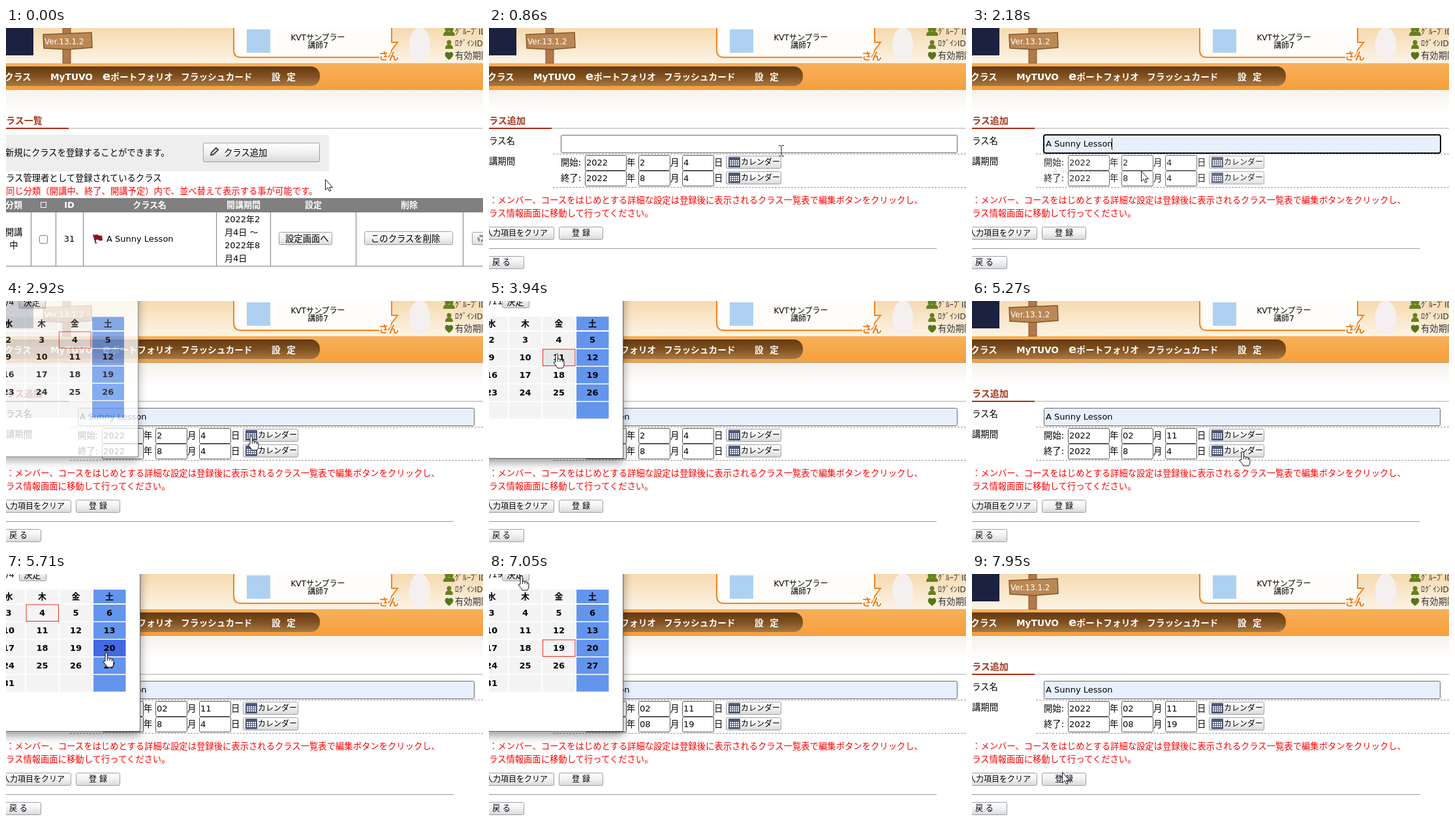
Write an HTML page that moves like this. It is 731x376 px and loops after 8 s.

```html
<!DOCTYPE html>
<html lang="ja">
<head>
<meta charset="utf-8">
<style>
  html, body { margin: 0; width: 100%; height: 100%; overflow: hidden; background: #fff; }
  svg { display: block; }
  text { font: 13.33px 'DejaVu Sans', 'Noto Sans CJK JP', sans-serif; white-space: pre; }
  .input { font-size: 13px; }
  .small { font-size: 12px; }
  .tiny { font-size: 11px; }
  .bold { font-weight: bold; }
  .mid { text-anchor: middle; }
  .nav { font-size: 13.7px; font-weight: bold; fill: #fff; }
  .title { font-size: 14px; font-weight: bold; fill: #a5371c; }
  .suffix { font-size: 15.5px; font-weight: 900; fill: #f47b14; stroke: #fff; stroke-width: 3px; paint-order: stroke; }
  .red { fill: #f00; }
  .window { filter: drop-shadow(0 6px 7px #0006); }
</style>
</head>
<body>
<svg width="731" height="376" viewBox="0 0 731 376">
  <defs>
    <linearGradient id="sky" x2="0" y2="1"><stop stop-color="#f6dab0"/><stop offset="1" stop-color="#fcf3e5"/></linearGradient>
    <linearGradient id="band" x2="0" y2="1"><stop stop-color="#f8b05a"/><stop offset="1" stop-color="#f69f3c"/></linearGradient>
    <linearGradient id="glow" x2="0" y2="1"><stop stop-color="#f6f1ea"/><stop offset="1" stop-color="#fff"/></linearGradient>
    <linearGradient id="bar" x2="0" y2="1"><stop stop-color="#643a12"/><stop offset=".5" stop-color="#80501f"/><stop offset="1" stop-color="#a87845"/></linearGradient>
    <linearGradient id="face" x2="0" y2="1"><stop stop-color="#fff"/><stop offset=".5" stop-color="#f1f1f1"/><stop offset="1" stop-color="#d6d9dc"/></linearGradient>
  </defs>
  <g id="header"></g>
  <g id="page"></g>
  <g id="overlay"></g>
</svg>
<script>
const CLASS_NAME = 'A Sunny Lesson';
const LOOP = 8000, PAGE_TIME = 860, STEP = 146.6;
const byId = id => document.getElementById(id);

const text = (x, y, str, cls = '', extra = '') =>
  `<text x="${x}" y="${y}" class="${cls}" ${extra}>${str}</text>`;
const rect = (x, y, w, h, fill, extra = '') =>
  `<rect x="${x}" y="${y}" width="${w}" height="${h}" fill="${fill}" ${extra}/>`;
const path = (d, stroke, extra = '') => `<path d="${d}" fill="none" stroke="${stroke}" ${extra}/>`;
const button = (x, y, w, h) => rect(x + .5, y + .5, w - 1, h - 1, 'url(#face)', 'stroke="#9a9fa5" rx="2"');
const inputBox = (x, y, value) =>
  rect(x + .5, y + .5, value.length > 3 ? 63 : 48, 23, '#fff', 'stroke="#555" rx="2"') +
  text(x + 2, y + 16, value, 'input');

function header() {
  const person = (x, y) => `<path d="M${x - 6} ${y + 7}q0-7 6-7t6 7z" fill="#66801f"/><circle cx="${x}" cy="${y - 3}" r="3.5" fill="#66801f"/>`;
  return rect(0, 0, 731, 54, 'url(#sky)') + rect(0, 54, 731, 40, 'url(#band)') +
    rect(0, 94, 731, 1, '#b5a48e') + rect(0, 95, 731, 35, 'url(#glow)') +
    rect(0, 0, 42, 42, '#1d2140') +
    rect(87, 0, 12, 54, '#b0794a', 'stroke="#84552c"') +
    '<path d="M57 10L131 7L132 30L95 33L58 31Z" fill="#bb8854" stroke="#84552c" stroke-width="1.5"/>' +
    text(59, 25, 'Ver.13.1.2', 'small', 'fill="#fff"') +
    '<path d="M349 -5V34q0 11 11 11H580q11 0 11-11l9-12h-9V-5Z" fill="#fffdfa" stroke="#f58220" stroke-width="2"/>' +
    rect(369, 2, 36, 36, '#aed1f1') +
    text(478, 19, 'KVTサンプラー', 'small mid') + text(478, 31, '講師7', 'small mid') +
    text(571, 49, 'さん', 'suffix') +
    '<ellipse cx="634" cy="26" rx="16" ry="27" fill="#f5f0f0"/>' +
    person(676, 5) + person(682, 5) + person(679, 25) +
    '<path d="M679 49q-8-6-6-10t6-1q4-3 6 1t-6 10" fill="#55751c"/>' +
    text(688, 10, 'ｸﾞﾙｰﾌﾟID', 'small', 'fill="#333"') +
    text(688, 28, 'ﾛｸﾞｲﾝID', 'small', 'fill="#333"') +
    text(688, 47, '有効期限', '', 'fill="#333"') +
    rect(-20, 59, 501, 30, 'url(#bar)', 'rx="14"') +
    text(-2, 80, 'クラス', 'nav') + text(68, 80, 'MyTUVO', 'nav') +
    text(148, 80, '<tspan font-size="18">e</tspan>ポートフォリオ', 'nav') +
    text(268, 80, 'フラッシュカード', 'nav') + text(407, 80, '設  定', 'nav');
}

const heading = str => text(0, 147, str, 'title') +
  rect(96, 153, 635, 2, '#d3d3d3') + rect(0, 153, 96, 2, '#b02a12');

function listPage() {
  const columns = [[12, '分類'], [97, 'ID'], [220, 'クラス名'], [364, '開講期間'], [471, '設定'], [618, '削除']];
  const dates = ['2022年2', '月4日 ～', '2022年8', '月4日'];
  return heading('ラス一覧') +
    rect(0, 164, 495, 56, '#eee') + text(-1, 196, '新規にクラスを登録することができます。') +
    button(302, 176, 179, 30) + path('M314 195l1-4 7-7 3 3-7 7z', '#444', 'stroke-width="2"') +
    text(334, 196, 'クラス追加') +
    text(0, 235, 'ラス管理者として登録されているクラス') +
    text(0, 255, '同じ分類（開講中、終了、開講予定）内で、並べ替えて表示する事が可能です。', 'red') +
    rect(0, 261, 731, 22, '#808080') +
    columns.map(([x, label]) => text(x, 276, label, 'bold mid input', 'fill="#fff"')).join('') +
    rect(53.5, 267.5, 8, 8, 'none', 'stroke="#fff"') +
    path('M38.5 283V365M76.5 283V365M118.5 283V365M322.5 283V365M405.5 283V365M536.5 283V365M700.5 283V365M0 365.5H731', '#808080') +
    text(12, 318, '開講', 'mid') + text(12, 338, '中', 'mid') +
    rect(51.5, 318.5, 12, 12, '#fff', 'stroke="#767676" rx="2"') +
    text(97, 328, '31', 'mid input') +
    '<path d="M133 317h2l4 14h-2zM135 318q4-2 7 0t5 0l1 8q-4 1-6-.5t-5 .5z" fill="#8c1228"/>' +
    text(154, 328, CLASS_NAME, 'input') +
    dates.map((line, i) => text(335, 298 + 20 * i, line, 'input')).join('') +
    button(418, 313, 82, 20) + text(428, 328, '設定画面へ') +
    button(549, 312, 136, 21) + text(559, 328, 'このクラスを削除') +
    button(714, 313, 40, 20) + '<circle cx="728" cy="323" r="4" fill="none" stroke="#888" stroke-width="3" stroke-dasharray="6 2"/>';
}

function dateRow(y, label, month, day) {
  return text(110, y + 16, label) +
    inputBox(147, y, '2022') + text(211, y + 16, '年') +
    inputBox(229, y, month) + text(278, y + 16, '月') +
    inputBox(296, y, day) + text(345, y + 16, '日') +
    button(363, y + 1, 85, 20) +
    rect(367, y + 3, 18, 16, '#4d5776', 'rx="1"') +
    path(`M369 ${y + 9}H383M369 ${y + 12}H383M369 ${y + 15}H383`, '#fff', 'stroke-width="2" stroke-dasharray="2 1"') +
    text(386, y + 15, 'カレンダー', 'small');
}

function nameField(filled, focused) {
  const fill = filled ? '#e8f0fe' : '#fff';
  return (focused
    ? rect(110, 164, 608, 28, fill, 'stroke="#101010" stroke-width="2" rx="3"')
    : rect(110.5, 164.5, 607, 27, fill, 'stroke="#666" rx="2"')) +
    (filled ? text(113, 182, CLASS_NAME, 'input') : '');
}

function formPage(s) {
  const filled = s >= 8, focused = s >= 2 && s < 13;
  const [m1, d1] = s >= 25 ? ['02', '11'] : ['2', '4'];
  const [m2, d2] = s >= 42 ? ['08', '19'] : ['8', '4'];
  return heading('ラス追加') +
    text(0, 178, 'ラス名') + text(0, 209, '講期間') +
    path('M98 193.5H731M98 244.5H731', '#999', 'stroke-dasharray="3 2"') +
    nameField(filled, focused) +
    (focused && s < 10 ? rect(filled ? 214 : 114, 169, 1, 18, '#000') : '') +
    dateRow(195, '開始:', m1, d1) + dateRow(219, '終了:', m2, d2) +
    text(0, 269, '：メンバー、コースをはじめとする詳細な設定は登録後に表示されるクラス一覧表で編集ボタンをクリックし、', 'red') +
    text(0, 289, 'ラス情報画面に移動して行ってください。', 'red') +
    button(-10, 305, 110, 20) + text(-6, 319, '入力項目をクリア', 'small') +
    button(107, 305, 68, 20) + text(141, 319, '登 録', 'small mid') +
    rect(0, 338, 686, 1, '#999') +
    button(-10, 350, 64, 20) + text(5, 364, '戻 る', 'small');
}

function suggestion(s) {
  const alpha = { 3: .5, 8: .6, 9: .15 }[s] ?? (s > 3 && s < 8 ? 1 : 0);
  if (!alpha) return '';
  return `<g opacity="${alpha}">` + rect(110, 194, 608, 46, '#fff') +
    text(124, 223, CLASS_NAME, 'tiny') + '</g>';
}

function calendar(s, mouse) {
  const second = s >= 31;
  const alpha = { 13: .3, 14: .78, 26: .38, 31: .5, 43: .38 }[s] ??
    (s > 14 && s < 26 || s > 31 && s < 43 ? 1 : 0);
  if (!alpha) return '';
  const firstWednesday = second ? 3 : 2, lastDay = second ? 31 : 28;
  const chosen = second ? (s >= 37 ? 19 : 4) : (s >= 21 ? 11 : 4);
  let cells = '';
  [...'水木金土'].forEach((name, col) => {
    const x = -20.5 + 51.5 * col, saturday = col === 3;
    for (let row = -1; row < 5; row++) {
      const y = row < 0 ? 24 : 47 + 27 * row, h = row < 0 ? 21 : 25.5;
      const day = firstWednesday + col + 7 * row;
      const valid = row >= 0 && day <= lastDay;
      const hover = valid && mouse.x >= x && mouse.x < x + 50 && mouse.y >= y && mouse.y < y + 26;
      const fill = saturday ? (hover ? '#4169e1' : '#6495ed') : hover ? '#e6e6e6' : '#f4f4f4';
      cells += rect(x, y, 49.5, h, fill, valid && day === chosen ? 'stroke="#e8281c"' : '');
      if (row < 0 || valid) cells += text(x + 24.5, row < 0 ? 39 : y + 17, row < 0 ? name : day, 'bold mid input');
    }
  });
  return `<g opacity="${alpha}" transform="translate(-10 53) scale(${.94 + .06 * alpha}) translate(10 -53)">` +
    rect(-220, -80, 425.5, 321.5, '#fff', 'stroke="#666" class="window"') +
    text(0, 5, '/' + chosen, 'input') +
    button(20, -12, 42, 23) + text(27, 6, '決定') + cells + '</g>';
}

// step, x, y of the hot spot, shape until the next key
const cursorKeys = [
  [-5, 489, 232, 'arrow'], [-2, 454, 194, 'hand'], [-1, 447, 187, 'hand'],
  [0, 448, 188, 'beam'], [3, 448, 188, 'beam'], [5, 300, 205, 'arrow'], [7, 259, 219, 'arrow'],
  [9, 259, 219, 'arrow'], [12, 376, 207, 'hand'], [14, 376, 207, 'hand'],
  [15, 310, 170, 'arrow'], [17, 150, 105, 'hand'], [19, 104, 81, 'hand'], [22, 104, 81, 'hand'],
  [24, 58, 4, 'hand'], [26, 60, 1, 'hand'], [27, 95, 35, 'arrow'], [29, 330, 180, 'arrow'],
  [30, 415, 231, 'hand'], [31, 415, 231, 'hand'], [32, 300, 185, 'arrow'], [33, 154, 121, 'hand'],
  [34, 154, 121, 'hand'], [35, 112, 116, 'hand'], [38, 112, 116, 'hand'], [41, 50, 3, 'hand'],
  [43, 50, 3, 'hand'], [44, 70, 70, 'arrow'], [46, 125, 240, 'arrow'], [48, 138, 304, 'arrow']
];
const cursorShapes = {
  arrow: '<path d="M.5 .5V16.5L4 13L6.5 18.5L9 17.5L6.5 12.5H11.5Z" fill="#fff" stroke="#1a1a2e"/>',
  hand: '<path d="M-2 12V2q0-2 1.7-2t1.7 2v6q3-1 3.5 1 3-1 3.5 1 2.5-.5 2.5 2v5q0 2-2 5H1q-1-3-6-8 0-2.5 3-1zM1.4 8v4M4.9 9v3M8.4 10v3" fill="#fff" stroke="#111"/>',
  beam: path('M-4 -7.5H-1L0 -6.5L1 -7.5H4M0 -6V7M-4 8.5H-1L0 7.5L1 8.5H4', '#111')
};

function cursorAt(s) {
  const i = cursorKeys.findLastIndex(key => key[0] <= s);
  const [s0, x0, y0, shape] = cursorKeys[i];
  const [s1, x1, y1] = cursorKeys[i + 1] ?? [s0 + 1, x0, y0];
  const u = (s - s0) / (s1 - s0);
  return { x: Math.round(x0 + (x1 - x0) * u), y: Math.round(y0 + (y1 - y0) * u), shape };
}

const stepAt = t => t < PAGE_TIME
  ? Math.min(-1, Math.floor((t - 80) / 110) - 4)
  : Math.floor((t - PAGE_TIME) / STEP);

let shown;
function render(s) {
  const mouse = cursorAt(s);
  byId('page').innerHTML = s < 0 ? listPage() : formPage(s);
  byId('overlay').innerHTML = suggestion(s) + calendar(s, mouse) +
    `<g transform="translate(${mouse.x} ${mouse.y})">${cursorShapes[mouse.shape]}</g>`;
}

function tick() {
  const s = stepAt(performance.now() % LOOP);
  if (s !== shown) render(shown = s);
  requestAnimationFrame(tick);
}

byId('header').innerHTML = header();
tick();
</script>
</body>
</html>
```
